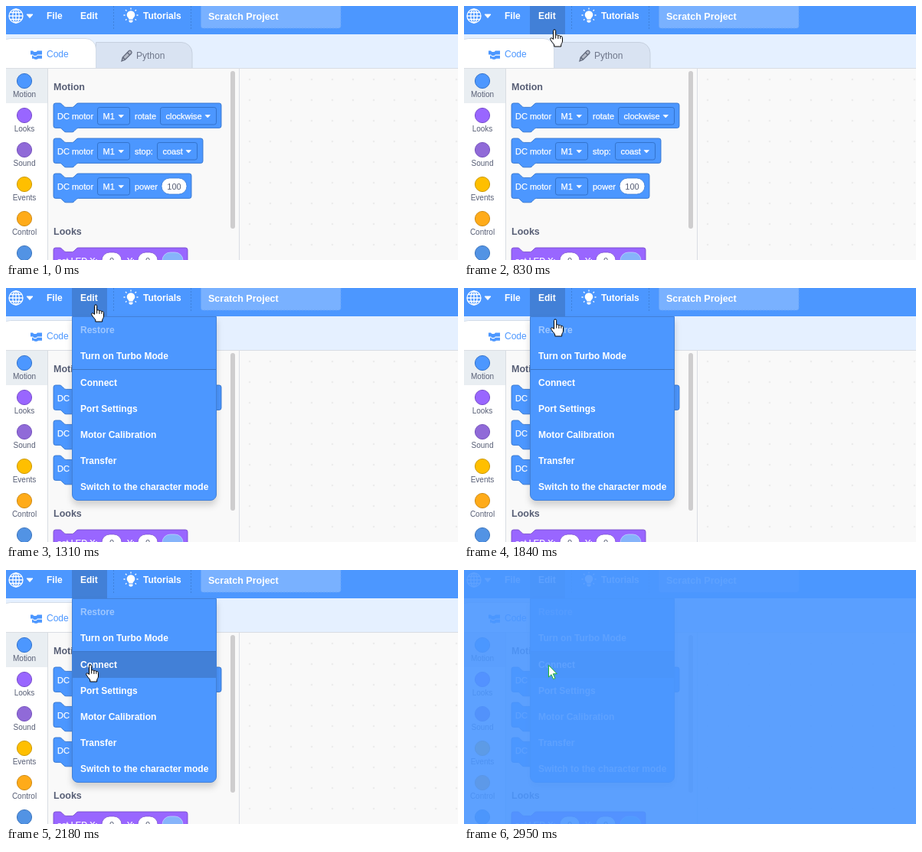
Animation, 590 px wide and 332 px high, one loop 3420 ms. Source, as an HTML page:

```html
<!DOCTYPE html>
<html lang="en">
<head>
<meta charset="utf-8">
<title>Connect menu</title>
<style>
html, body { margin: 0; width: 100%; height: 100%; overflow: hidden; background: #f9f9f9; }
svg { display: block; width: 100vw; height: 100vh; }
text { font-family: "Liberation Sans", Arial, sans-serif; font-size: 12px; white-space: pre; }
.bar text, .menu text { font-weight: bold; fill: #fff; }
.cat text { font-size: 10px; fill: #575e75; text-anchor: middle; }
.head { font-size: 12.5px; font-weight: bold; fill: #575e75; }
.block text { font-size: 11px; fill: #fff; stroke: #fff; stroke-width: .25px; }
.block .num { fill: #575e75; stroke: none; text-anchor: middle; }
.line { fill: none; stroke: #fff; stroke-width: 1.3; }
.menu-box { filter: drop-shadow(0 6px 4px rgba(0, 0, 0, .16)); }
#python.hover { fill: #e5f0ff; }
</style>
</head>
<body>
<svg viewBox="0 0 590 332">
  <defs>
    <pattern id="grid" x="304.5" y="82.5" width="27" height="27" patternUnits="userSpaceOnUse">
      <rect x="12.8" y="12.8" width="1.4" height="1.4" fill="#d4d4d4"/>
    </pattern>
  </defs>
  <rect width="590" height="332" fill="#f9f9f9"/>

  <!-- tabs -->
  <rect y="37" width="590" height="45" fill="#e5f0ff"/>
  <path id="python" d="M117.5 82V47.500H229a14 14 0 0 1 14 14V82" fill="#d9e3f2" stroke="#c6d0df"/>
  <path d="M-8 82V56a13.500 13.500 0 0 1 13.500-13.500H104a13.500 13.500 0 0 1 13.500 13.500V82" fill="#fff" stroke="#d3dce8"/>
  <path d="M32 58.500h3l1.500 1.500h3l1.500-1.500h6v5h-6l-1.500 1.500h-3l-1.500-1.500h-3zM34 64.700h1l1.500 1.500h3l1.500-1.500h6v4h-5l-1.500 1h-3l-1-1H34z" fill="#4c97ff"/>
  <text x="53" y="67" fill="#4c97ff">Code</text>
  <path d="M151 72l1.300-5 8-8.300q1.500-1.200 3 .3t.3 3l-8.200 8.200zM152.500 67l3.500 3.300M158.300 60.800l3.500 3.500" fill="#b4bac7" stroke="#646b7e" stroke-width="1.300"/>
  <text x="170" y="69" fill="#6f778b">Python</text>

  <!-- categories -->
  <rect y="82" width="54" height="250" fill="#fff"/>
  <rect y="82" width="54" height="45" fill="#e9eef2"/>
  <g class="cat" id="cats"></g>
  <path d="M0 81.500H590M54.500 82V332M304.500 82V332" stroke="#d9dde3"/>

  <!-- palette -->
  <text class="head" x="62" y="109.500">Motion</text>
  <text class="head" x="62" y="299">Looks</text>
  <g id="blocks"></g>
  <rect x="293" y="85" width="6" height="206" rx="3" fill="#cecdce"/>
  <rect x="305" y="82" width="285" height="250" fill="url(#grid)"/>

  <!-- menu bar -->
  <g class="bar">
    <rect width="590" height="37" fill="#4c97ff"/>
    <rect id="edit" x="86" width="46" height="37" fill="#4280d7"/>
    <g class="line">
      <circle cx="13" cy="13" r="9"/>
      <ellipse cx="13" cy="13" rx="4.200" ry="9"/>
      <path d="M13 4V22M4 13H22M5.500 8.500H20.500M5.500 17.500H20.500"/>
    </g>
    <path d="M27 11h8l-4 4.500z" fill="#fff" stroke="#fff" stroke-linejoin="round"/>
    <text x="53" y="17">File</text>
    <text x="97" y="17">Edit</text>
    <path d="M140.500 0V30M241.500 0V30" stroke="#3f80da" stroke-dasharray="2 2"/>
    <path d="M160.500 17.500c0-2-2.800-3-2.800-6a5.300 5.300 0 0 1 10.600 0c0 3-2.800 4-2.800 6zM160.500 18.500h5v2q-2.500 2.600-5 0z" fill="#fff"/>
    <path d="M163 2.500V4.500M156 5l1.500 1.500M170 5l-1.500 1.500M153.500 12h2M170.500 12h2M156 18.500l1.500-1.300M170 18.500l-1.500-1.300" class="line"/>
    <text x="179" y="17">Tutorials</text>
    <rect x="254.500" y="-5.500" width="182.500" height="34.500" rx="3" fill="#79b1ff" stroke="#69a5f7" stroke-dasharray="2 2"/>
    <text x="264" y="17.500" style="font-size:12.5px">Scratch Project</text>
  </g>

  <g class="menu" id="menu">
    <path class="menu-box" d="M86.500 37.500H274.500V270a7.500 7.500 0 0 1-7.500 7.500H94a7.500 7.500 0 0 1-7.500-7.500z" fill="#4c97ff" stroke="#4280d7"/>
    <rect id="hot" x="87" width="187" height="34" fill="#4280d7"/>
    <path d="M87 106.500H274" stroke="#3b76c8"/>
  </g>

  <rect id="veil" width="590" height="332" fill="#4c97ff" opacity=".9"/>
  <g id="cursor" stroke-linejoin="round">
    <circle id="click" r="12" fill="#ffe600" opacity=".62"/>
    <path id="arrow" d="M.5.5V16l3.500-3.300 2.600 5.800 2.300-1-2.600-5.800h5z" fill="#fff"/>
    <g id="hand" stroke="#000" fill="#fff">
      <path d="M-1.500 12.500V1.500a1.600 1.600 0 0 1 3.200 0V7.500c.5-1 3-.9 3.200.5 .7-.8 2.800-.5 3 .8 .8-.6 2.600-.2 2.600 1.600V15c0 2-1.500 3-1.800 5v2H-.2v-2C-1 18-4 15.500-5.200 12.800c-.8-1.600 1-2.600 2.200-1.600z"/>
      <path d="M1.700 7.500v4M4.900 8v4M7.900 8.800v3" fill="none"/>
    </g>
  </g>
</svg>
<script>
const LOOP = 3420;
const $ = id => document.getElementById(id);
const show = (id, on) => $(id).setAttribute('visibility', on ? 'visible' : 'hidden');
const label = (x, y, s, attr = '') => `<text x="${x}" y="${y}" ${attr}>${s}</text>`;

$('cats').innerHTML = [
  ['Motion', '#4c97ff', '#3373cc'], ['Looks', '#9966ff', '#774dcb'], ['Sound', '#906ad8', '#7653bd'],
  ['Events', '#ffbf00', '#cc9900'], ['Control', '#ffab19', '#cf8b17'], ['Sensing', '#5293e4', '#3c75bd']
].map(([name, fill, edge], i) =>
  `<circle cx="24" cy="${98 + 45 * i}" r="9.600" fill="${fill}" stroke="${edge}"/>` +
  label(24, 119 + 45 * i, name)).join('');

// Stack block with top notch and bottom bump, in unscaled block units.
function block(y, width, fill, edge, content) {
  const w = width / .675 - 4;
  const d = `M0 4A4 4 0 0 1 4 0H12c2 0 3 1 4 2l4 4c1 1 2 2 4 2h12c2 0 3-1 4-2l4-4c1-1 2-2 4-2H${w}
    a4 4 0 0 1 4 4v40a4 4 0 0 1-4 4H48c-2 0-3 1-4 2l-4 4c-1 1-2 2-4 2h-12c-2 0-3-1-4-2l-4-4
    c-1-1-2-2-4-2H4a4 4 0 0 1-4-4z`;
  return `<g class="block" transform="translate(62 ${y})">
    <path transform="scale(.675)" d="${d}" fill="${fill}" stroke="${edge}" stroke-width="1.3"/>${content}</g>`;
}
const word = (x, s) => label(x, 21, s);
const drop = (x, w, s) =>
  `<rect x="${x + .5}" y="5.500" width="${w - 1}" height="22.500" rx="2.700" fill="#4c97ff" stroke="#3373cc"/>` +
  word(x + 7.5, s) + `<path d="M${x + w - 15} 15.500h6.500l-3.250 3.500z" fill="#fff" stroke="#fff" stroke-width=".6" stroke-linejoin="round"/>`;
const pill = (x, w, s, edge, fill = '#fff') =>
  `<rect x="${x}" y="6" width="${w}" height="21" rx="10.500" fill="${fill}" stroke="${edge}" stroke-width=".7"/>` +
  label(x + w / 2, 20.5, s, 'class="num"');

const motor = word(5, 'DC motor') + drop(57, 43, 'M1');
const blue = ['#4c97ff', '#3373cc'], violet = ['#9966ff', '#774dcb'];
$('blocks').innerHTML =
  block(127, 219, ...blue, motor + word(106, 'rotate') + drop(139, 74, 'clockwise')) +
  block(173, 195, ...blue, motor + word(106, 'stop:') + drop(135, 53, 'coast')) +
  block(219, 180, ...blue, motor + word(106, 'power') + pill(141, 33, '100', blue[1])) +
  block(316, 175, ...violet, word(5, 'set LED X:') + pill(63, 26, '0', violet[1]) +
    word(96, 'Y:') + pill(110, 26, '0', violet[1]) + pill(142, 27, '', '#c5d8ff', '#86b4fa'));

const items = { 'Restore': 59, 'Turn on Turbo Mode': 93, 'Connect': 128, 'Port Settings': 162,
  'Motor Calibration': 196, 'Transfer': 230, 'Switch to the character mode': 264 };
for (const [name, y] of Object.entries(items))
  $('menu').insertAdjacentHTML('beforeend', label(97, y, name, y === 59 ? 'opacity=".45"' : ''));

// Pointer samples: time, x, y, shape
const path = [
  [130, 403, 316, 'arrow'], [210, 374, 268, 'arrow'], [290, 310, 194, 'arrow'], [370, 235, 128, 'arrow'],
  [450, 165, 76, 'hand'], [530, 127, 50, 'hand'], [610, 121, 45, 'arrow'],
  [690, 119, 36, 'hand'], [770, 118, 31, 'hand'], [850, 118, 27, 'hand'], [920, 117, 24, 'hand'],
  [1000, 117, 23, 'hand'], [1070, 117, 22, 'hand'],
  [1840, 119, 41, 'hand'], [1940, 117, 62, 'hand'], [2020, 114, 90, 'hand'], [2100, 111, 115, 'hand'],
  [2180, 110, 124, 'hand'], [2860, 110, 124, 'arrow']
];

function draw(t) {
  const within = (a, b) => t >= a && t < b;
  const [, x, y, shape] = path.filter(p => p[0] <= t).pop() || [0, -50, -50, ''];
  const veiled = t >= 2950, open = t >= 1310;
  $('cursor').setAttribute('transform', `translate(${x} ${y})`);
  show('arrow', shape === 'arrow');
  show('hand', shape === 'hand');
  show('click', within(1140, 1310) || within(2710, 2860));
  $('arrow').setAttribute('stroke', veiled ? '#22b52c' : '#000');
  $('python').classList.toggle('hover', within(450, 610));
  show('edit', t >= 690);
  $('menu').style.display = open ? '' : 'none';
  show('hot', open && y > 71);
  $('hot').setAttribute('y', y < 107 ? 72 : 107);
  show('veil', veiled);
}

function tick() {
  draw(performance.now() % LOOP);
  requestAnimationFrame(tick);
}
tick();
</script>
</body>
</html>
```
